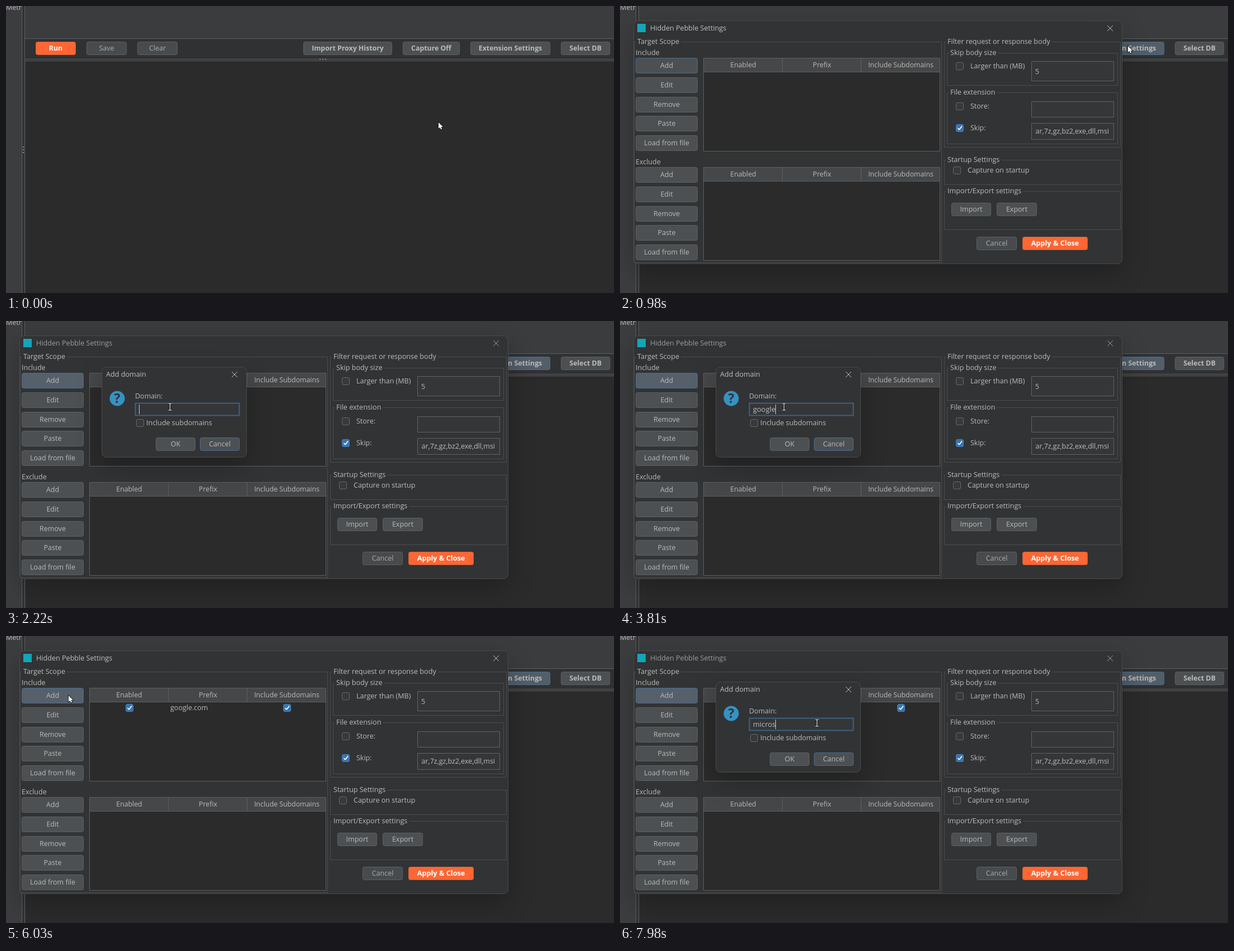
These frames come from a looping animation (1088 px wide and 515 px high, 8 s). An HTML page with a canvas:

```html
<!DOCTYPE html>
<html lang="en">
<head>
<meta charset="utf-8">
<title>Extension settings</title>
<style>
html, body { margin: 0; width: 100%; height: 100%; overflow: hidden; background: #2b2b2b; }
canvas { display: block; }
</style>
</head>
<body>
<canvas id="stage" width="1088" height="515"></canvas>
<script>
const W = 1088, H = 515, LOOP = 8000, REFRESH = 92;
const screen2d = document.getElementById('stage').getContext('2d');
const layer2d = Object.assign(document.createElement('canvas'), { width: W, height: H }).getContext('2d');
let g = screen2d;

const PANEL = '#323334', EDITOR = '#2b2b2b', FIELD = '#353638', LINE = '#5c5e60', FRAME = '#4b4d4f';
const TEXT = '#bbbbbb', BLUE = '#466d94';
const PRIMARY = { color: '#ffffff', fillColor: '#ff6633', border: '#c4623f', weight: 700 };
const QUIET = { fillColor: '#484b4d', color: '#a9abad' };

// ---- timing ----

// Progress 0..1 that advances in screen-refresh steps.
function progress(t, start, end) {
  const steps = Math.max(1, Math.round((end - start) / REFRESH));
  const done = Math.floor((t - start) / (end - start) * steps + .1) / steps;
  return Math.min(1, Math.max(0, done));
}

const smooth = p => p * p * (3 - 2 * p);
const opening = (t, start) => 1 - (1 - progress(t, start, start + 270)) ** 2.4;

function pointerAt(t) {
  const pos = { x: 774, y: 209 };
  const move = (start, end, x, y) => {
    const p = smooth(progress(t, start, end));
    pos.x += (x - pos.x) * p;
    pos.y += (y - pos.y) * p;
  };
  move(0, 620, 911, 72);
  move(890, 980, 909, 72);
  move(980, 1450, 112, 107);
  move(1640, 2220, 293, 154);
  move(4640, 5040, 240, 183);
  move(5140, 5350, 303, 219);
  move(5450, 5950, 112, 107);
  move(6220, 6590, 352, 156);
  return pos;
}

// pace > 1 speeds up towards the end, pace < 1 slows down.
function typed(word, t, start, end, pace) {
  if (t < start) return '';
  const p = Math.min(1, (t - start) / (end - start));
  return word.slice(0, 1 + Math.floor((word.length - 1) * p ** pace));
}

// ---- drawing helpers ----

function fill(x, y, w, h, color) {
  g.fillStyle = color;
  g.fillRect(x, y, w, h);
}

function box(x, y, w, h, color, border, radius = 0, weight = 1) {
  g.beginPath();
  g.roundRect(x + .5, y + .5, w - 1, h - 1, radius);
  if (color) { g.fillStyle = color; g.fill(); }
  if (border) { g.strokeStyle = border; g.lineWidth = weight; g.stroke(); }
}

function line(x1, y1, x2, y2, color, weight = 1) {
  g.beginPath();
  g.moveTo(x1, y1);
  g.lineTo(x2, y2);
  g.strokeStyle = color;
  g.lineWidth = weight;
  g.stroke();
}

function setFont(size, weight = 400) {
  g.font = `${weight} ${size}px "Open Sans", "Noto Sans", sans-serif`;
}

// y is the middle of the capital letters.
function text(s, x, y, { color = TEXT, size = 12.5, weight = 400, align = 'left' } = {}) {
  setFont(size, weight);
  g.textAlign = align;
  g.fillStyle = color;
  g.fillText(s, x, Math.round(y + size * .34));
}

function clipped(x, y, w, h, draw) {
  g.save();
  g.beginPath();
  g.rect(x, y, w, h);
  g.clip();
  draw();
  g.restore();
}

function button(label, x, y, w, h, { fillColor = '#4c5052', border = '#5e6062', ...style } = {}) {
  box(x, y, w, h, fillColor, border, 3);
  text(label, x + w / 2, y + h / 2, { align: 'center', ...style });
}

function checkbox(x, y, checked, label, labelX) {
  box(x - 7, y - 7, 14, 14, checked ? '#3874ae' : '#37393b', checked ? '#4383bd' : '#66686a', 2.5);
  if (checked) {
    line(x - 3.5, y, x - 1, y + 3, '#ffffff', 1.8);
    line(x - 1, y + 3, x + 4, y - 3.5, '#ffffff', 1.8);
  }
  if (label) text(label, labelX, y);
}

function group(label, x, y, right, bottom) {
  box(x, y, right - x, bottom - y, null, FRAME);
  setFont(12.6);
  fill(x + 3, y - 7, g.measureText(label).width + 6, 14, PANEL);
  text(label, x + 6, y, { size: 12.6 });
}

function windowFrame(title, x, y, w, h, titleX, color) {
  g.shadowColor = 'rgba(0,0,0,.25)';
  g.shadowBlur = 45;
  g.shadowOffsetY = 16;
  box(x, y, w, h, PANEL, null, 8);
  g.shadowColor = 'transparent';
  box(x, y, w, h, null, '#484a4b', 8);
  text(title, titleX, y + 14, { color, size: 12.6 });
  const cx = x + w - 22, cy = y + 14;
  line(cx - 5, cy - 5, cx + 5, cy + 5, color);
  line(cx - 5, cy + 5, cx + 5, cy - 5, color);
}

// ---- scene ----

function drawBackground(hoverSettings) {
  fill(0, 0, W, H, EDITOR);
  fill(0, 0, 28, H, '#3c3d3f');
  fill(28, 0, 7, H, PANEL);
  fill(34, 0, W, 59, '#3b3c3e');
  fill(34, 59, W, 40, '#303132');
  for (const x of [28, 33]) fill(x, 0, 1, H, LINE);
  for (const y of [58, 95, 98]) fill(34, y, W, 1, LINE);
  for (let i = -1; i < 2; i++) {
    box(29.5, 256.5 + i * 5, 3, 3, '#b0b0b0', null, 1);
    box(565.5 + i * 5, 94, 3, 3, '#b0b0b0', null, 1);
  }
  clipped(0, 0, 28, H, () => text('Method', 0, 3));

  const bold = { weight: 700, size: 12.35 };
  const hover = hoverSettings ? { fillColor: '#535e68', border: BLUE } : {};
  button('Run', 53, 64, 72, 24, { ...PRIMARY, size: 12.35 });
  button('Save', 144, 64, 72, 24, QUIET);
  button('Clear', 235, 64, 72, 24, QUIET);
  button('Import Proxy History', 532, 64, 159, 24, bold);
  button('Capture Off', 710, 64, 102, 24, bold);
  button('Extension Settings', 831, 64, 143, 24, { ...bold, ...hover });
  button('Select DB', 993, 64, 88, 24, bold);
}

function scopeTable(label, y, addStyle) {
  text(label, 28, y - 9);
  ['Add', 'Edit', 'Remove', 'Paste', 'Load from file'].forEach((name, i) =>
    button(name, 28, Math.round(y + i * 34.75), 111, 28, i ? {} : addStyle));
  box(149, y, 424, 168, EDITOR, LINE);
  fill(150, y + 1, 422, 24, '#454749');
  fill(149, y + 25, 424, 1, LINE);
  ['Enabled', 'Prefix', 'Include Subdomains'].forEach((name, i) => {
    if (i) fill(149 + i * 141, y, 1, 25, LINE);
    text(name, 220.5 + i * 141, y + 13, { align: 'center', size: 12.3 });
  });
}

function drawSettings({ active, hoverAdd, hasRow }) {
  const titleColor = active ? '#c0c0c0' : '#9c9d9e';
  windowFrame('Hidden Pebble Settings', 24, 26, 875, 437, 54, titleColor);
  fill(31, 32, 15, 15, '#14a5b8');

  group('Target Scope', 25, 64, 576, 461);
  scopeTable('Include', 93, { border: BLUE, fillColor: hoverAdd ? '#55606b' : '#4c5052' });
  scopeTable('Exclude', 289);
  if (hasRow) {
    checkbox(221, 129, true, 'google.com', 294);
    checkbox(503, 129, true);
  }

  group('Filter request or response body', 580, 64, 896, 254);
  group('Skip body size', 585, 84, 891, 143);
  group('File extension', 585, 155, 891, 248);
  checkbox(608, 108, false, 'Larger than (MB)', 627);
  checkbox(608, 180, false, 'Store:', 627);
  checkbox(608, 219, true, 'Skip:', 627);
  box(736, 99, 148, 36, FIELD, '#616365');
  box(736, 171, 148, 29, FIELD, '#616365');
  box(736, 210, 148, 30, FIELD, '#616365');
  text('5', 743, 118);
  clipped(743, 212, 134, 26, () => text('rar,7z,gz,bz2,exe,dll,msi', 875, 225, { align: 'right' }));

  group('Startup Settings', 580, 276, 896, 321);
  checkbox(603, 295, false, 'Capture on startup', 622);
  group('Import/Export settings', 580, 332, 896, 402);
  button('Import', 593, 353, 71, 24);
  button('Export', 674, 353, 72, 24);
  button('Cancel', 638, 414, 72, 24, QUIET);
  button('Apply & Close', 720, 414, 117, 24, { ...PRIMARY, size: 12.7 });
}

function drawDomainDialog({ entry, caret, checked, hoverOk }) {
  windowFrame('Add domain', 171, 82, 260, 163, 179, '#c0c0c0');
  box(185, 125, 28, 28, '#3592c4', null, 14);
  text('?', 199, 139, { color: PANEL, size: 23, weight: 700, align: 'center' });
  text('Domain:', 231, 135);
  box(231, 147, 187, 23, FIELD, checked ? '#646464' : '#3d6185', 0, checked ? 1 : 2);
  text(entry, 238, 159, { size: 12.9 });
  if (caret) fill(Math.round(238 + g.measureText(entry).width), 150, 1, 17, '#d0d0d0');
  checkbox(240, 183, checked, 'Include subdomains', 251);
  button('OK', 268, 209, 71, 24, { fillColor: hoverOk ? '#55585a' : '#4c5052' });
  button('Cancel', 347, 209, 71, 24, { border: BLUE });
}

// Paints a whole window, then fades and scales it as one picture.
function showWindow(draw, alpha, ox, oy) {
  if (alpha <= 0) return;
  const scale = .8 + .2 * alpha;
  layer2d.clearRect(0, 0, W, H);
  g = layer2d;
  draw();
  g = screen2d;
  g.save();
  g.globalAlpha = alpha;
  g.translate(ox * (1 - scale), oy * (1 - scale));
  g.scale(scale, scale);
  g.drawImage(layer2d.canvas, 0, 0);
  g.restore();
}

function drawPointer(x, y, beam) {
  if (beam) {
    for (const [color, weight] of [['#1c1c1c', 3], ['#ffffff', 1]]) {
      line(x + .5, y - 6, x + .5, y + 6, color, weight);
      line(x - 2.5, y - 6, x + 3.5, y - 6, color, weight);
      line(x - 2.5, y + 6, x + 3.5, y + 6, color, weight);
    }
    return;
  }
  const arrow = new Path2D(`M${x} ${y}v11l2.5-2.3 1.9 3.9 1.8-.8L${x + 4.5} ${y + 8}h3.5z`);
  g.strokeStyle = '#111111';
  g.lineWidth = 1.6;
  g.stroke(arrow);
  g.fillStyle = '#ffffff';
  g.fill(arrow);
}

function render(t) {
  const { x, y } = pointerAt(t);
  const over = (left, top, w, h) => x >= left && x < left + w && y >= top && y < top + h;
  const secondRound = t >= 6130;
  const checked = t >= 5040 && !secondRound;
  const domainAlpha = secondRound ? opening(t, 6130) : opening(t, 1540) * (1 - progress(t, 5450, 5760));

  drawBackground(t >= 530);
  showWindow(() => drawSettings({
    active: domainAlpha === 0,
    hoverAdd: domainAlpha > 0 || over(28, 93, 111, 28),
    hasRow: t >= 5655
  }), opening(t, 710), 318, 168);
  showWindow(() => drawDomainDialog({
    entry: secondRound ? typed('micros', t, 7240, 7980, .7) : typed('google.com', t, 2620, 4250, 1.6),
    caret: !checked && !(t >= 7050 && t < 7240),
    checked,
    hoverOk: over(268, 209, 71, 24)
  }), domainAlpha, 301, 163);
  drawPointer(Math.round(x), Math.round(y), domainAlpha > .9 && over(231, 147, 187, 23));
}

function tick() {
  render(performance.now() % LOOP);
  requestAnimationFrame(tick);
}
tick();
</script>
</body>
</html>
```
